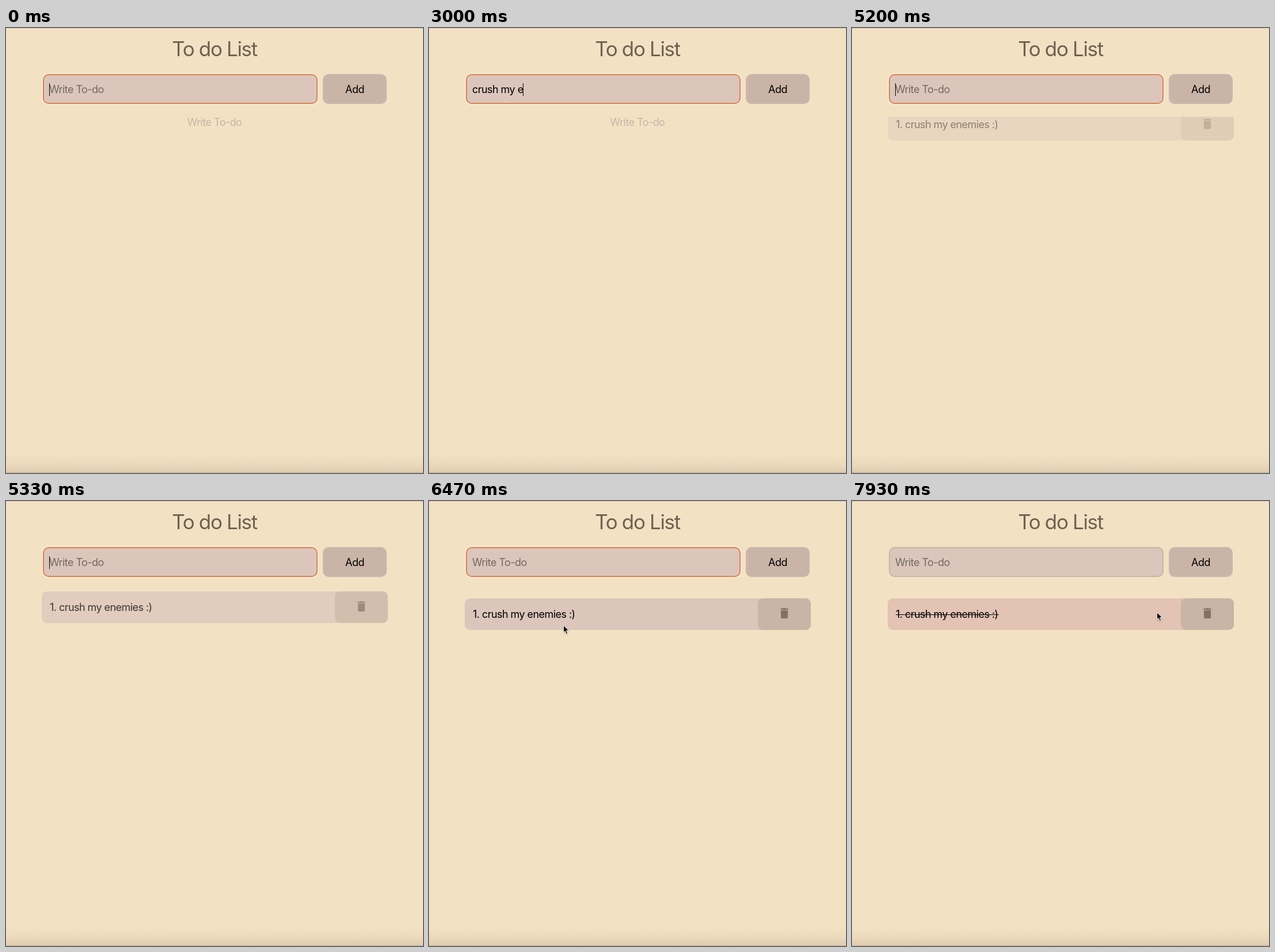
Write an HTML page that moves like this. It is 724 px wide and 773 px high and loops after 8 s.

```html
<!DOCTYPE html>
<html lang="en">
<head>
<meta charset="utf-8">
<title>To do List</title>
<style>
  html, body { margin: 0; width: 100%; height: 100%; overflow: hidden; }
  body {
    position: relative;
    background: #f3e1c4;
    font: 18px/24px Inter, "Open Sans", sans-serif;
    letter-spacing: -0.55px;
    color: #000;
    cursor: default;
  }
  div, svg { position: absolute; box-sizing: border-box; white-space: pre; }
  #topline { left: 0; right: 0; top: 0; height: 1px; background: #d6c2ad; }
  #shade {
    left: 0; right: 0; top: 740px; height: 33px;
    background: linear-gradient(#f3e1c4, #ecd9bc 60%, #dfcbb0);
    border-bottom: 1px solid #c5ae98;
  }
  #title {
    left: 0; width: 724px; top: 14px;
    font-size: 35px; line-height: 44px; letter-spacing: -1.35px;
    text-align: center; color: #6f6150;
  }
  #field {
    left: 64px; top: 80px; width: 477px; height: 52px;
    border: 2px solid #cab4a7; border-radius: 10px; background: #dcc6bb;
  }
  #field.focus { border-color: #dc8152; box-shadow: 0 0 0 1.5px #fbeedb; }
  #typed, #hint { left: 75px; top: 95px; }
  #hint { color: #736860; }
  #caret { top: 96px; width: 1.3px; height: 21.5px; background: #000; }
  #add {
    left: 550px; top: 80px; width: 111px; height: 52px;
    border: 2px solid #cdb6ad; border-radius: 10px; background: #cab4a7;
    line-height: 50px; text-align: center;
  }
  #empty { left: 0; width: 724px; top: 152px; text-align: center; color: #cab4a7; }
  #list { left: 0; width: 724px; top: 154px; height: 200px; overflow: hidden; }
  #item { left: 62px; top: 14.5px; width: 601px; height: 55px; border-radius: 9px; }
  #label { left: 14px; top: 16px; }
  #strike { left: 0; right: -1px; top: 12px; height: 1.5px; background: #000; }
  #remove { right: 0; top: 0; width: 92px; height: 55px; border-radius: 9px; background: #cab4a7; }
  #remove svg { left: 34px; top: 14px; fill: #837163; }
  #mouse { left: 0; top: 0; overflow: visible; filter: drop-shadow(0 1px 1px rgba(0, 0, 0, .3)); }
</style>
</head>
<body>
<div id="topline"></div>
<div id="shade"></div>
<div id="title">To do List</div>
<div id="field"></div>
<div id="hint">Write To-do</div>
<div id="typed"></div>
<div id="caret"></div>
<div id="add">Add</div>
<div id="empty">Write To-do</div>
<div id="list">
  <div id="item">
    <div id="label">1. crush my enemies :)<div id="strike"></div></div>
    <div id="remove">
      <svg width="24" height="24" viewBox="0 0 24 24"><path d="M6 19c0 1.1.9 2 2 2h8c1.1 0 2-.9 2-2V7H6zM19 4h-3.5l-1-1h-5l-1 1H5v2h14z"/></svg>
    </div>
  </div>
</div>
<svg id="mouse" width="12" height="18"><path d="M.5 .5V13L3.3 10.4 5.4 15.3 7.6 14.4 5.6 9.6H9.6Z" stroke="#fff" stroke-width="1" stroke-linejoin="round"/></svg>
<script>
const LOOP = 8000, TICK = 1000 / 15;
const ENTER = 5066, BLUR = 6866, CHECK = 6998;
const $ = id => document.getElementById(id);
const [field, hint, typed, caret, empty, item, strike, mouse] =
  ["field", "hint", "typed", "caret", "empty", "item", "strike", "mouse"].map($);

// One time per key press; the second letter is first mistyped and erased.
const phrase = "crush my enemies :) ";
const keys = [330, 1470, 1530, 1930, 2130, 2270, 2470, 2730, 2870, 3000,
  3130, 3200, 3400, 3670, 3870, 4000, 4200, 4670, 4870, 4930];
const caretOff = [[200, 330], [1270, 1470], [5400, 5930], [6470, LOOP]];

// x, y of the pointer at given times
const path = [[6466, 233, 215.5], [6533, 206, 193], [6733, 206, 193],
  [7200, 154, 193], [7666, 154, 193], [7933, 529, 193]];

const clamp = v => Math.max(0, Math.min(1, v));
const smooth = v => v * v * (3 - 2 * v);
const show = (el, on) => { el.style.visibility = on ? "visible" : "hidden"; };
const mix = (a, b, k) => `rgb(${a.map((v, i) => Math.round(v + (b[i] - v) * k))})`;

// The CSS "ease" curve, cubic-bezier(.25, .1, .25, 1)
function ease(x) {
  if (x <= 0 || x >= 1) return clamp(x);
  const curve = (u, a, b) => 3 * u * (1 - u) ** 2 * a + 3 * u * u * (1 - u) * b + u ** 3;
  let lo = 0, hi = 1;
  for (let i = 0; i < 20; i++) {
    const mid = (lo + hi) / 2;
    if (curve(mid, .25, .25) < x) lo = mid; else hi = mid;
  }
  return curve(lo, .1, 1);
}

function textAt(t) {
  if (t >= ENTER) return "";
  if (t >= 730 && t < 1130) return "cu";
  return phrase.slice(0, keys.filter(k => t >= k).length);
}

function pointAt(t) {
  const i = path.findIndex(p => p[0] > t);
  if (i < 0) return path[path.length - 1].slice(1);
  const [t0, x0, y0] = path[i - 1], [t1, x1, y1] = path[i];
  const k = smooth((t - t0) / (t1 - t0));
  return [x0 + (x1 - x0) * k, y0 + (y1 - y0) * k];
}

function render(t) {
  const step = Math.floor((t + 3.5) / TICK) * TICK;
  const text = textAt(t);
  if (typed.textContent !== text) typed.textContent = text;
  show(hint, !text);
  field.className = t < BLUR ? "focus" : "";
  caret.style.left = 74.6 + typed.getBoundingClientRect().width + "px";
  show(caret, !caretOff.some(([a, b]) => t >= a && t < b));

  show(empty, t < ENTER);
  const k = ease((step - 5027) / 667);
  item.style.opacity = t < ENTER ? 0 : k;
  item.style.transform = `translateY(${-50 * (1 - k)}px)`;
  item.style.background = mix([220, 198, 187], [226, 195, 180], clamp((step - CHECK) / 300));
  show(strike, t >= CHECK);

  show(mouse, t >= 6464);
  if (t >= 6464) {
    const [x, y] = pointAt(Math.max(step, 6466));
    mouse.style.transform = `translate(${x}px, ${y}px)`;
  }
}

const start = performance.now();
function frame() {
  render((performance.now() - start) % LOOP);
  requestAnimationFrame(frame);
}
frame();
</script>
</body>
</html>
```
